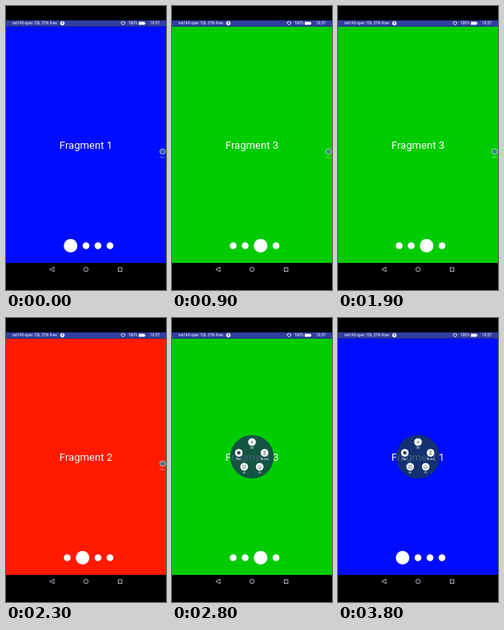
An HTML page for the animation above (4100 ms loop, 200 by 356 pixels).

```html
<!DOCTYPE html>
<html lang="en">
<head>
<meta charset="utf-8">
<title>Fragment pager</title>
<style>
  html, body { margin: 0; width: 100%; height: 100%; overflow: hidden; background: #000; }
  svg { display: block; width: 100%; height: 100%; font-family: Roboto, sans-serif; fill: #fff; }
  .page, .knob, .menu { animation: 4.1s step-end infinite; }
  .page { visibility: hidden; }
  .title { font-size: 13.1px; text-anchor: middle; }
  .small { font-size: 3.6px; text-anchor: middle; }
  .p1 { animation-name: p1; }
  .p2 { animation-name: p2; }
  .p3 { animation-name: p3; }
  .p4 { animation-name: p4; }
  .knob { animation-name: knob; }
  .menu { animation-name: menu; transform-origin: 100px 174px; }

  @keyframes p1 {
    0%, 58.537%, 92.683%, 100% { visibility: visible; }
    9.756%, 65.854% { visibility: hidden; }
  }
  @keyframes p2 {
    0%, 21.951%, 58.537%, 68.293%, 100% { visibility: hidden; }
    9.756%, 56.098%, 65.854% { visibility: visible; }
  }
  @keyframes p3 {
    0%, 34.146%, 56.098%, 80.488%, 100% { visibility: hidden; }
    21.951%, 46.341%, 68.293% { visibility: visible; }
  }
  @keyframes p4 {
    0%, 46.341%, 92.683%, 100% { visibility: hidden; }
    34.146%, 80.488% { visibility: visible; }
  }
  @keyframes knob {
    0% { visibility: visible; }
    60.976%, 100% { visibility: hidden; }
  }
  @keyframes menu {
    0% { visibility: hidden; transform: scale(.55); }
    60.976% { visibility: visible; transform: scale(.55); }
    63.415%, 100% { visibility: visible; transform: none; }
  }
</style>
</head>
<body>
<svg viewBox="0 0 200 356">
  <rect width="200" height="356" fill="#000"/>
  <g id="pages"></g>

  <g class="status">
    <rect y="18" width="200" height="7.7" fill="#303f9f"/>
    <text x="8" y="23.3" font-size="4.6">net140 open 12h, 27th Free</text>
    <circle cx="70.5" cy="21.6" r="2.7"/>
    <path d="M69.4 20.7h2.2M70.5 20.7v2.2" stroke="#303f9f" stroke-width=".8"/>
    <path d="M143.5 20.8Q146.3 18 149.1 20.8L146.3 24Z" fill="none" stroke="#fff" stroke-width=".8"/>
    <text x="152.7" y="23.4" font-size="5">100%</text>
    <path d="M166 19.8h7.2v.9h1v2h-1v.9H166z"/>
    <text x="180" y="23.4" font-size="4.9">10:57</text>
  </g>

  <g fill="none" stroke="#d4d8ea" stroke-width=".8">
    <path d="M54.8 330.2L60 327.4V333Z"/>
    <circle cx="100" cy="330.2" r="2.7"/>
    <rect x="140.3" y="328" width="4.6" height="4.6"/>
  </g>

  <g class="knob">
    <circle cx="195.8" cy="182.5" r="3.5" fill="#3c82aa" fill-opacity=".75" stroke="#fff" stroke-opacity=".65" stroke-width=".8"/>
    <text class="small" x="195.5" y="191.2" fill-opacity=".6">60s</text>
  </g>

  <g class="menu">
    <circle cx="100" cy="174" r="27.2" fill="#183a54" fill-opacity=".82"/>
    <g id="items"></g>
  </g>
</svg>
<script>
  const dots = big => {
    let x = 72.25;
    return [0, 1, 2, 3].map(i => {
      const r = i === big ? 8.5 : 4.25;
      const dot = `<circle cx="${x + r}" cy="300.4" r="${r}"/>`;
      x += 2 * r + 6.5;
      return dot;
    }).join('');
  };

  const colors = ['#000cff', '#ff1a00', '#00cc00', '#908b38'];
  document.getElementById('pages').innerHTML = colors.map((color, i) => `
    <g class="page p${i + 1}">
      <rect y="25.7" width="200" height="296.3" fill="${color}"/>
      <text class="title" x="100" y="179">Fragment ${i + 1}</text>
      ${dots(i)}
    </g>`).join('');

  // Glyphs are drawn around the centre of each menu item.
  const items = [
    [100, 155.5, 'Off', '<circle r="1.5" fill="#8a96a0" stroke="none"/>'],
    [83.5, 169, 'Rec', '<rect x="-1.7" y="-1.7" width="3.4" height="3.4" rx=".6" fill="#26384a"/>'],
    [115.7, 169, 'Home', '<path d="M-1.4-2.2h2.8L-1.4 2.2h2.8z"/>'],
    [90.2, 186.5, '66', '<path d="M-2-1.8h4v3.6h-4zM-1 1L1-.8"/>'],
    [109.6, 186.5, '33', '<path d="M0-2.2L2.2 0L1.3 2h-2.6L-2.2 0zM-1 .4h2"/>']
  ];
  document.getElementById('items').innerHTML = items.map(([x, y, label, glyph]) => `
    <g transform="translate(${x} ${y})">
      <circle r="4.8"/>
      <g fill="none" stroke="#4a5a68" stroke-width=".6">${glyph}</g>
      <text class="small" y="8.6">${label}</text>
    </g>`).join('');
</script>
</body>
</html>
```
